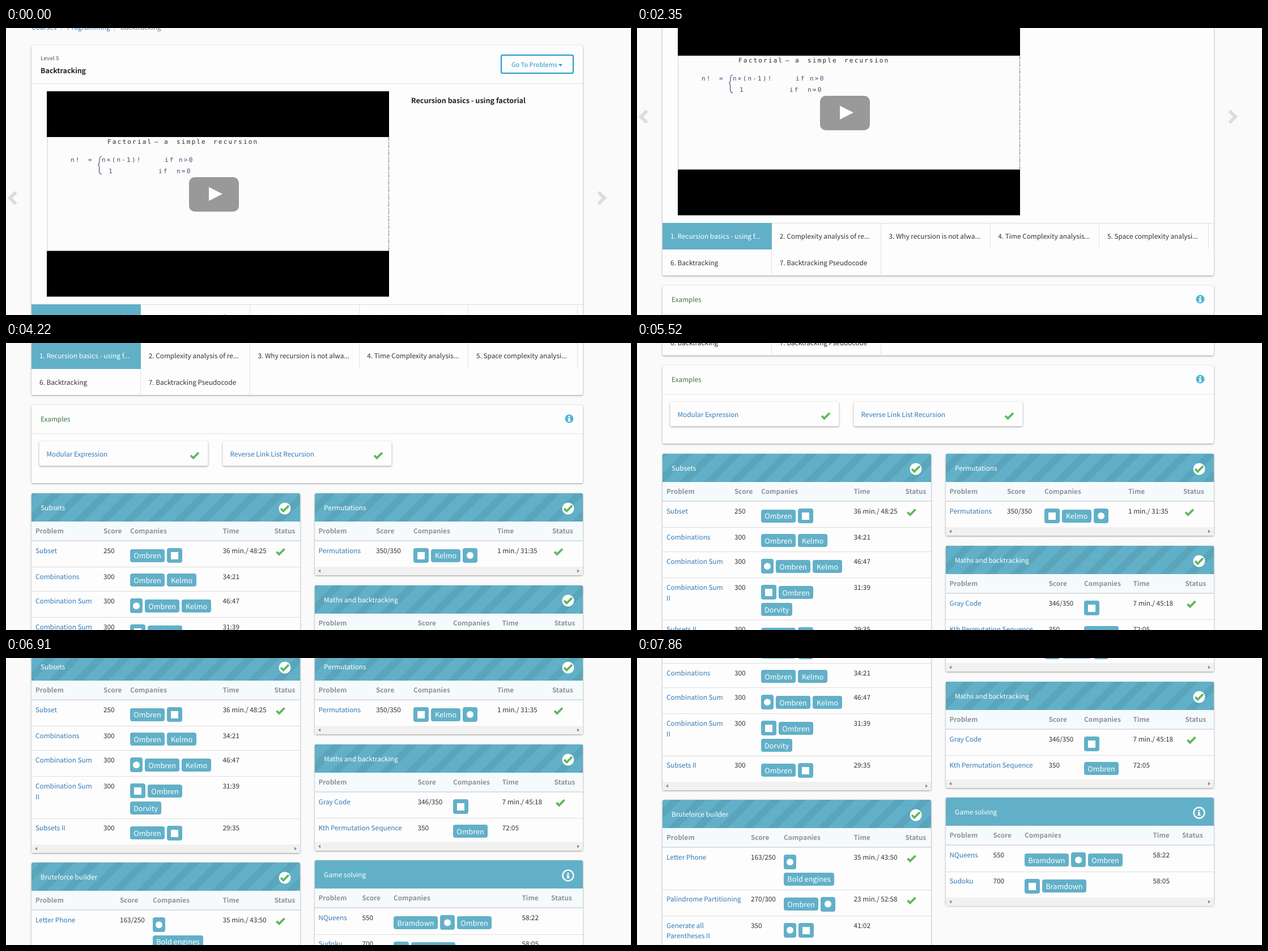
Write an HTML page that moves like this. It is 1103 px wide and 508 px high and loops after 8000 ms.

```html
<!DOCTYPE html>
<html lang="en">
<head>
<meta charset="utf-8">
<title>Backtracking course</title>
<style>
html, body { margin: 0; width: 100%; height: 100%; overflow: hidden; background: #fafafa; }
svg { display: block; }
text { font-family: "Noto Sans CJK JP", "Noto Sans CJK SC", "Noto Sans CJK", "Noto Sans", sans-serif; text-rendering: geometricPrecision; white-space: pre; }
.b { font-weight: 700; }
.mid { text-anchor: middle; }
.hand { font-family: "DejaVu Sans Mono", monospace; letter-spacing: 2.2px; }
.card { fill: #fdfdfd; filter: drop-shadow(0 1px 1.5px rgba(0, 0, 0, .4)); }
</style>
</head>
<body>
<svg width="1103" height="508" viewBox="0 0 1103 508">
  <defs>
    <pattern id="stripes" width="44" height="50" patternUnits="userSpaceOnUse" patternTransform="skewX(-45)">
      <rect width="18" height="50" fill="#5aa5bb"/>
    </pattern>
  </defs>
  <g id="page"></g>
</svg>
<script>
const BLUE = '#62b0c8', LINK = '#337ab7', GREEN = '#5cb85c', RULE = '#ddd', INK = '#333';
const out = [];
const add = s => out.push(s);

const rect = (x, y, w, h, fill, more = '') =>
  add(`<rect x="${x}" y="${y}" width="${w}" height="${h}" fill="${fill}" ${more}/>`);
const card = (x, y, w, h) => rect(x, y, w, h, '#fdfdfd', 'rx="3" class="card"');
const path = (d, fill, more = '') => add(`<path d="${d}" fill="${fill}" ${more}/>`);
const stroke = (d, color, width, more = '') =>
  path(d, 'none', `stroke="${color}" stroke-width="${width}" ${more}`);
const disc = (x, y, r, fill, more = '') =>
  add(`<circle cx="${x}" cy="${y}" r="${r}" fill="${fill}" ${more}/>`);

// y is the middle of the capital letters
function text(x, y, s, fill = INK, size = 11.8, cls = '') {
  s = s.replace(/</g, '&lt;').replace(/>/g, '&gt;');
  add(`<text x="${x}" y="${y + size * .366}" fill="${fill}" font-size="${size}" class="${cls}">${s}</text>`);
}
const check = (x, y) => stroke(`M${x - 7} ${y}l4.5 4.5l9.5 -9.5`, GREEN, 3.8);

function info(x, y, r, fill, ink) {
  disc(x, y, r, fill, fill === 'none' ? `stroke="${ink}" stroke-width="2.4"` : '');
  path(`M${x - 1.5} ${y - 5}h3v2.6h-3zM${x - 2.5} ${y - 1.2}h4v4.4h1.2v1.8h-5.2v-1.8h1.2v-2.6h-1.2z`, ink);
}

function lesson() {
  text(45, -1, 'Courses', LINK);
  text(97, -1, '/', '#bbb');
  text(108, -1, 'Programming', LINK);
  text(190, -1, '/', '#bbb');
  text(202, -1, 'Backtracking', '#777');

  card(45, 31, 973, 551);
  text(61, 54, 'Level 5', '#888', 9.5, 'b');
  text(61, 75, 'Backtracking', '#222', 12.4, 'b');
  rect(874, 48, 127, 32, 'none', 'rx="2" stroke="#1f9aca" stroke-width="2"');
  text(892, 64.5, 'Go To Problems', '#1f9aca', 11);
  path('M975 64h7l-3.5 4z', '#1f9aca');
  rect(45, 98, 973, 1, RULE);
  text(715, 128, 'Recursion basics - using factorial', '#222', 12.6, 'b');
  video();
  tabs();

  for (const [x, d] of [[17.5, -1], [1045.5, 1]])
    stroke(`M${x} 290.5l${d * 10.5} 10.5l${-d * 10.5} 10.5`, '#dcdcdc', 6);
}

function video() {
  rect(72, 112, 604, 363.5, '#000');
  rect(72, 193, 604, 201.5, '#fcfcfc');
  rect(72, 193, 1.5, 201.5, '#d5dde6');
  stroke('M675.5 193v201', '#777', 1, 'stroke-dasharray="7 2 3 1"');
  const pen = (x, y, s, fill = '#4b4b75', size = 11) => text(x, y, s, fill, size, 'hand');
  for (const [x, s] of [[179, 'Factorial'], [262, '–'], [279, 'a'], [301, 'simple'], [366, 'recursion']])
    pen(x, 201, s, '#2c2c30');
  for (const [x, s] of [[114, 'n!'], [145, '='], [169, 'n×(n-1)!'], [280, 'if'], [305, 'n>0']])
    pen(x, 233, s);
  for (const [x, s] of [[181, '1'], [269, 'if'], [301, 'n=0']])
    pen(x, 253, s);
  stroke('M169 227q-4 0 -4 6t-2 9q2 2 1.500 9t4.500 8', '#4b4b75', 1.2);
  rect(323, 264, 88, 61, '#999', 'rx="10"');
  path('M358 281.500v24.500l24 -12.250z', '#fff');
}

function tabs() {
  const names = ['1. Recursion basics - using f...', '2. Complexity analysis of re...',
    '3. Why recursion is not alwa...', '4. Time Complexity analysis...',
    '5. Space complexity analysi...', '6. Backtracking', '7. Backtracking Pseudocode'];
  rect(45, 489, 973, 1, RULE);
  names.forEach((s, i) => {
    const x = 45 + i % 5 * 192.75, y = i < 5 ? 489 : 536;
    rect(Math.round(x + 192), y, 1, 47, '#e2e2e2');
    if (!i) rect(45, 489, 193, 47, BLUE);
    text(x + 14, y + 24, s, i ? INK : '#fff');
  });
}

function examples() {
  card(45, 600, 973, 138);
  text(61, 625, 'Examples', '#3c763d');
  info(994, 624, 7.5, '#4fb4d8', '#fff');
  rect(45, 650, 973, 1, '#e0e8d6');
  [[58.5, 'Modular Expression'], [382.5, 'Reverse Link List Recursion']].forEach(([x, s]) => {
    card(x, 664, 298, 43.5);
    text(x + 13, 686.5, s, LINK);
    check(x + 274.5, 689);
  });
}

const WIDTH = { Ombren: 61, Kelmo: 52, Dorvity: 55, Bramdown: 78, Bold_engines: 89, w: 27, f: 22, g: 26 };
const isIcon = s => s.length === 1;

function badges(x0, y, lines) {
  lines.split('|').forEach((line, i) => {
    let x = x0;
    const cy = y + i * 29.7;
    for (const s of line.split(' ')) {
      const w = WIDTH[s], h = isIcon(s) ? 26 : 23;
      rect(x, Math.round(cy - h / 2), w, h, BLUE, 'rx="4"');
      if (s === 'w') rect(x + 7, Math.round(cy) - 6, 13, 13, '#fff');
      else if (isIcon(s)) disc(x + w / 2, cy, 6, '#fff');
      else text(x + w / 2, cy + .8, s.replace('_', ' '), '#fff', 12.7, 'mid');
      x += w + 4;
    }
  });
}

function rowHeight([name, , tags]) {
  const h = /\b[wfg]\b/.test(tags) ? 46.2 : 43;
  return Math.max(h + (tags.includes('|') ? 28 : 0), name.includes('|') ? 55 : 0);
}

// Draws a problem table and returns the top of the one below it
function table(x, top, title, cols, rows, solved = true) {
  const w = x < 100 ? 474 : 473, y0 = Math.round(top);
  const height = 99 + rows.reduce((sum, r) => sum + rowHeight(r), 0);
  const head = `M${x} ${y0 + 50}v-47q0 -3 3 -3h${w - 6}q3 0 3 3v47z`;
  card(x, y0, w, Math.round(height));
  path(head, BLUE);
  if (solved) path(head, 'url(#stripes)');
  text(x + 16, y0 + 25.5, title, '#fff');
  const ix = x + 447, iy = y0 + 27;
  if (solved) {
    disc(ix, iy, 10.5, '#fff');
    check(ix, iy);
  } else info(ix, iy, 9.5, 'none', '#fff');

  rect(x, y0 + 50, w, 33, '#f5fafd');
  rect(x, y0 + 83, w, 2, RULE);
  ['Problem', 'Score', 'Companies', 'Time', 'Status'].forEach((s, i) =>
    text(cols[i], y0 + 67, s, '#909396', 11.8, 'b'));

  let y = top + 84;
  rows.forEach((row, i) => {
    const [name, score, tags, time, done] = row;
    if (i) rect(x, Math.round(y), w, 1, RULE);
    name.split('|').forEach((s, k) => text(cols[0], y + 17.5 + k * 18.5, s, LINK));
    text(cols[1], y + 17.5, score);
    badges(cols[2], y + (/\b[wfg]\b/.test(tags) ? 26 : 23.5), tags);
    text(cols[3], y + 17.5, time);
    if (done) check(cols[4] + 11, y + 19.5);
    y += rowHeight(row);
  });

  y = Math.round(y);
  rect(x, y, w, 15, '#f1f1f1');
  path(`M${x + 6} ${y + 7.5}l4 -3v6zM${x + w - 6} ${y + 7.5}l-4 -3v6z`, '#8a8a8a');
  return top + height + 17.5;
}

lesson();
examples();

const next = table(45, 756, 'Subsets', [52, 172, 219, 382.5, 473.5], [
  ['Subset', '250', 'Ombren w', '36 min./ 48:25', true],
  ['Combinations', '300', 'Ombren Kelmo', '34:21'],
  ['Combination Sum', '300', 'f Ombren Kelmo', '46:47'],
  ['Combination Sum|II', '300', 'w Ombren|Dorvity', '31:39'],
  ['Subsets II', '300', 'Ombren w', '29:35']]);
table(45, next, 'Bruteforce builder', [52, 201, 259, 382.5, 473.5], [
  ['Letter Phone', '163/250', 'f|Bold_engines', '35 min./ 43:50', true],
  ['Palindrome Partitioning', '270/300', 'Ombren g', '23 min./ 52:58', true],
  ['Generate all|Parentheses II', '350', 'f w', '41:02']]);

const maths = table(545, 756, 'Permutations', [551.5, 653, 719, 867, 964], [
  ['Permutations', '350/350', 'w Kelmo g', '1 min./ 31:35', true]]);
const games = table(545, maths, 'Maths and backtracking', [551.5, 726.5, 789, 875.5, 967.5], [
  ['Gray Code', '346/350', 'w', '7 min./ 45:18', true],
  ['Kth Permutation Sequence', '350', 'Ombren', '72:05']]);
table(545, games, 'Game solving', [551.5, 628.5, 684, 910.5, 962], [
  ['NQueens', '550', 'Bramdown g Ombren', '58:22'],
  ['Sudoku', '700', 'w Bramdown', '58:05']], false);

const page = document.getElementById('page');
page.innerHTML = out.join('');

// [time in ms, scroll offset]: wheel notches of 35 px, caught part-way
const SCROLL = [
  [0, 0], [500, 4], [630, 35], [1210, 39], [1340, 70], [1800, 78], [1920, 140],
  [2350, 144], [2470, 175], [2850, 200], [3000, 290], [3120, 350], [3520, 356],
  [3640, 385], [4070, 410], [4220, 490], [4680, 525], [5390, 529], [5520, 560],
  [5830, 570], [5980, 605], [6120, 640], [6250, 665], [6550, 670], [6670, 700],
  [6790, 735], [6910, 766], [7060, 800], [7180, 825], [7300, 837], [7460, 838],
  [7580, 875], [7860, 877]];

function draw() {
  const t = performance.now() % 8000;
  const [, offset] = SCROLL.findLast(([start]) => start <= t);
  page.setAttribute('transform', `translate(0 ${-offset})`);
  requestAnimationFrame(draw);
}
draw();
</script>
</body>
</html>
```
